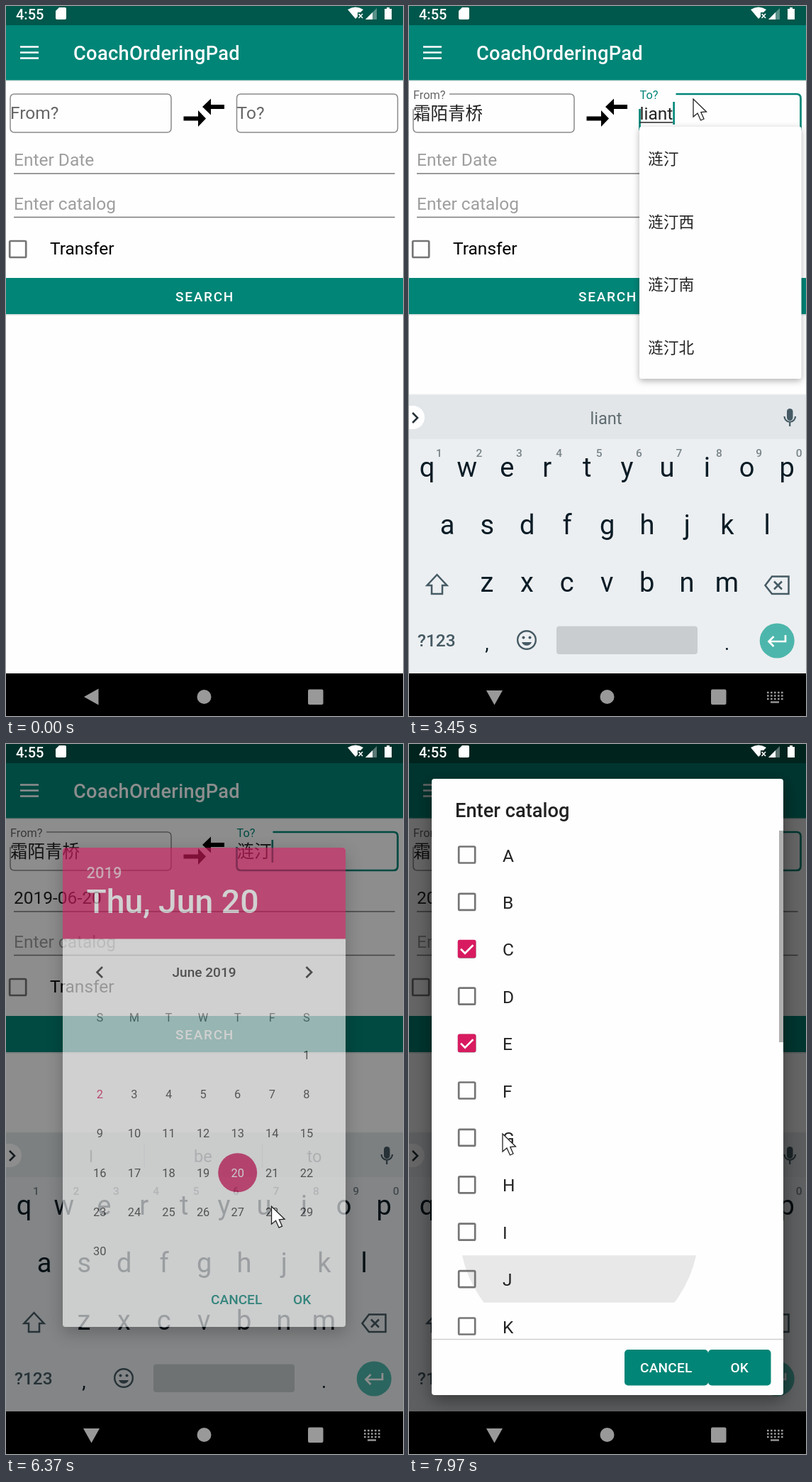
Recreate the animation shown at these times as an HTML page. Size 560 by 1000 pixels, loop 7990 ms.

```html
<!DOCTYPE html>
<html lang="en">
<head>
<meta charset="utf-8">
<title>Ticket search</title>
<style>
html, body { margin: 0; width: 100%; height: 100%; overflow: hidden; background: #fefefe; }
svg { display: block; width: 100vw; height: 100vh; }
text { font-family: Roboto, "Noto Sans CJK SC", "Noto Sans CJK", sans-serif; white-space: pre; }
.popup { filter: drop-shadow(0 3px 5px rgba(0,0,0,.3)); }
.dialog { filter: drop-shadow(0 8px 12px rgba(0,0,0,.4)); }
</style>
</head>
<body>
<script>
const LOOP = 7990, TEAL = '#008577', PINK = '#d81b60', INK = '#222', GREY = '#757575';
const NS = 'http://www.w3.org/2000/svg';

function el(tag, attrs, parent) {
  const node = document.createElementNS(NS, tag);
  set(node, attrs);
  parent.appendChild(node);
  return node;
}
function set(node, attrs) {
  for (const k in attrs) node.setAttribute(k, attrs[k]);
}
const group = (parent, attrs = {}) => el('g', attrs, parent);
const rect = (p, x, y, width, height, fill, rx = 0) => el('rect', { x, y, width, height, fill, rx }, p);
const circle = (p, cx, cy, r, fill) => el('circle', { cx, cy, r, fill }, p);
const shape = (p, d, fill) => el('path', { d, fill }, p);
const line = (p, d, stroke, width = 2.5) =>
  el('path', { d, fill: 'none', stroke, 'stroke-width': width }, p);
function text(p, x, y, str, size, fill, weight = 400, anchor = 'start', spacing = 0) {
  const node = el('text', { x, y, fill, 'font-size': size, 'font-weight': weight,
    'text-anchor': anchor, 'letter-spacing': spacing }, p);
  node.textContent = str;
  return node;
}
const show = (node, on) => node.setAttribute('display', on ? 'inline' : 'none');
const fade = (node, a) => { show(node, a > 0); node.setAttribute('opacity', a); };
const say = (node, str) => { if (node.textContent !== str) node.textContent = str; };
const ramp = (t, a, b) => Math.max(0, Math.min(1, (t - a) / (b - a)));
const mix = (a, b, k) => a + (b - a) * k;
const easeOut = k => 1 - (1 - k) ** 3;
const inside = (t, a, b) => t >= a && t < b;

const svg = el('svg', { viewBox: '0 0 560 1000', preserveAspectRatio: 'none' }, document.body);
const defs = el('defs', {}, svg);
const clip = (id, x, y, w, h) => rect(el('clipPath', { id }, defs), x, y, w, h, '#000');

// ---- page
rect(svg, 0, 0, 560, 1000, '#fefefe');
rect(svg, 0, 104, 560, 2, '#e3e7e6');
rect(svg, 0, 27, 560, 77.5, TEAL);
rect(svg, 0, 0, 560, 27, '#00574b');
line(svg, 'M20 57.5H46M20 65.5H46M20 73.5H46', '#fff', 2.7);
text(svg, 95, 76, 'CoachOrderingPad', 27.25, '#fff', 500, 'start', .3);

function makeField(x, label) {
  const g = group(svg), r = x + 227;
  const frame = line(g, '', GREY);
  const value = text(g, x, 160, '', 24.5, INK);
  const under = line(g, '', INK, 1.4);
  const caret = rect(g, 0, 135, 2.6, 32, TEAL);
  const name = text(g, 0, 0, label, 24.5, '#666');
  const closed = `M${x + 6} 124H${r - 6}q6 0 6 6V172q0 6 -6 6H${x + 6}q-6 0 -6 -6V130q0 -6 6 -6z`;
  const notched = `M${x + 51} 124H${r - 6}q6 0 6 6V172q0 6 -6 6H${x + 6}q-6 0 -6 -6V145`;
  return (up, focus, str, composing, blinkOn) => {
    set(frame, { d: up > .3 ? notched : closed, stroke: focus ? TEAL : '#8a8a8a',
      'stroke-width': focus ? 2.7 : 1.5 });
    set(name, { fill: focus ? TEAL : '#666',
      transform: `translate(${x} ${mix(159, 131, up)}) scale(${mix(1, .667, up)})` });
    say(value, str);
    const w = str ? value.getComputedTextLength() : 0;
    under.setAttribute('d', composing && w ? `M${x} 164H${x + w}` : '');
    caret.setAttribute('x', x + w);
    show(caret, focus && blinkOn);
  };
}
const fromField = makeField(6, 'From?');
const toField = makeField(325.5, 'To?');

shape(svg, 'M277 142L289 130.500V139H308V145H289V153.500ZM282 158.500L271 147V155.500H250.500V161.500H271V170Z', '#000');
const date = text(svg, 11, 224.5, '', 24.5, '#9e9e9e');
line(svg, 'M11 236H548.500M11 297.500H548.500', '#7a7a7a', 1.4);
text(svg, 11, 287, 'Enter catalog', 24.5, '#9e9e9e');
const box = (p, x, y) =>
  el('rect', { x, y, width: 23, height: 23, rx: 1.5, fill: 'none', stroke: GREY, 'stroke-width': 2.7 }, p);
box(svg, 5.2, 331);
text(svg, 62, 350, 'Transfer', 24.5, '#000');
rect(svg, 0, 434, 560, 2, '#e3e7e6');
rect(svg, 0, 383, 560, 51, TEAL);
text(svg, 239, 416, 'SEARCH', 19.07, '#fff', 500, 'start', 1.7);

// ---- suggestion lists
function makeList(x, bottom, items) {
  const g = group(svg, { class: 'popup' });
  rect(g, x, 170, 228.5, bottom - 170, '#fefefe', 3);
  items.forEach((s, i) => text(g, x + 12, 223 + i * 88.6, s, 21.7, INK));
  return g;
}
const fromList = makeList(5.5, 552, ['霜陌南', '霜陌', '霜陌青桥', '霜陌西']);
rect(fromList, 228, 170, 6, 324.5, '#b3b3b3');
const toList = makeList(325, 525, ['涟汀', '涟汀西', '涟汀南', '涟汀北']);

// ---- keyboard
const keys = group(svg), KEY = '#0a1c26', ICON = '#455a64';
rect(keys, 0, 546.5, 560, 2, '#eceeef');
rect(keys, 0, 548, 560, 392, '#eceff1');
rect(keys, 0, 548, 560, 62, '#e2e6e9');
shape(keys, 'M0 563H5.500a16.500 16.500 0 0 1 0 33H0z', '#fff');
line(keys, 'M5 573L12 580L5 587', '#263238', 2.6);
const dividers = line(keys, 'M195 563V597M361.500 563V597', '#c3c8cb', 1.4);
const hints = [120, 278, 435].map(x => text(keys, x, 589, '', 23.6, '#5f6b71', 400, 'middle'));
rect(keys, 533, 567, 8.5, 17, ICON, 4.2);
line(keys, 'M529.500 578a7.700 7.700 0 0 0 15.500 0M537.200 586V592', ICON, 2.2);
[['qwertyuiop', 25.5, 663], ['asdfghjkl', 54, 744], ['zxcvbnm', 110, 825]].forEach(([row, x, y]) =>
  [...row].forEach((c, i) => text(keys, x + i * 56.4, y, c, 38, KEY, 400, 'middle')));
[...'1234567890'].forEach((c, i) => text(keys, 42.5 + i * 56.4, 635, c, 15.5, '#78848a', 500, 'middle'));
line(keys, 'M39.500 801L53.500 816H47V828H32V816H25.500Z', ICON);
line(keys, 'M512 803.500H535.500V828H512L502.500 816ZM515 810.500L526 821.500M526 810.500L515 821.500', ICON);
text(keys, 12, 902, '?123', 24.5, ICON, 500);
text(keys, 110, 907, ',', 27, KEY, 400, 'middle');
text(keys, 448.5, 907, '.', 27, KEY, 400, 'middle');
el('circle', { cx: 166, cy: 893, r: 12.8, fill: 'none', stroke: ICON, 'stroke-width': 2.4 }, keys);
circle(keys, 161.5, 889.5, 2, ICON);
circle(keys, 170.5, 889.5, 2, ICON);
shape(keys, 'M159 896H173a7.500 7.500 0 0 1 -14 0z', ICON);
rect(keys, 208, 873.5, 199, 39.5, '#c9cdd0', 4);
circle(keys, 519.2, 894, 24.5, '#4db6ac');
line(keys, 'M531 886V895H508M514.500 888L507.500 895L514.500 902', '#fff', 2.7);

const dim = rect(svg, 0, 0, 560, 940, '#000');

// ---- status icons
text(svg, 14, 18.5, '4:55', 20, '#fff', 500);
shape(svg, 'M75 2H83q2 0 2 2V17q0 2 -2 2H72q-2 0 -2 -2V7z', '#fff');
shape(svg, 'M482 5Q493 -2 504 5L500 9H496V15L493 18Z', '#fff');
line(svg, 'M497.500 11L503 17M503 11L497.500 17', '#fff', 1.6);
shape(svg, 'M507 19H523V3Z', 'rgba(255,255,255,.35)');
shape(svg, 'M507 19H517V9Z', '#fff');
shape(svg, 'M534 4H537V2H541V4H544V19H534Z', '#fff');

// ---- date dialog
const cal = group(svg, { class: 'dialog' });
rect(cal, 80, 146, 399, 675, '#fefefe', 4);
shape(cal, 'M80 274.500V150q0 -4 4 -4H475q4 0 4 4V274.500z', PINK);
text(cal, 113.5, 189, '2019', 22, 'rgba(255,255,255,.7)', 500);
const heading = text(cal, 113.5, 238, '', 46.4, '#fff', 500);
text(cal, 279.5, 328, 'June 2019', 19.07, '#2a2a2a', 500, 'middle');
line(cal, 'M136 314L128.500 321.500L136 329M423.500 314L431 321.500L423.500 329', INK, 2.7);
const colX = i => 132.3 + i * 48.6;
[...'SMTWTFS'].forEach((c, i) => text(cal, colX(i), 391, c, 16.4, GREY, 400, 'middle'));
const disc = circle(cal, 0, 0, 27.5, PINK);
const days = [];
for (let n = 1; n <= 30; n++)
  days[n] = text(cal, colX((n + 5) % 7), 443.5 + Math.floor((n + 5) / 7) * 55.35, n, 16.4, '#333', 400, 'middle');
const okRipple = rect(cal, 374, 758, 88, 48, 'rgba(0,133,119,.15)', 4);
text(cal, 289, 789, 'CANCEL', 19.07, TEAL, 500);
text(cal, 405, 789, 'OK', 19.07, TEAL, 500);

function drawCalendar(t) {
  const day = t < 4900 ? 2 : t < 5650 ? 13 : 20;
  say(heading, (day === 2 ? 'Sun' : 'Thu') + ', Jun ' + day);
  set(disc, { cx: colX((day + 5) % 7), cy: 437.7 + Math.floor((day + 5) / 7) * 55.35 });
  [2, 13, 20].forEach(n => days[n].setAttribute('fill', n === day ? '#fff' : n === 2 ? PINK : '#333'));
  fade(okRipple, inside(t, 6060, 6300) ? ramp(t, 6060, 6120) : 0);
}

// ---- catalog dialog
const cat = group(svg, { class: 'dialog' }), ROW = 66.4;
rect(cat, 32, 49, 496, 868, '#fefefe', 4);
text(cat, 65, 103, 'Enter catalog', 27.25, INK, 500);
clip('list', 32, 122, 496, 716);
clip('rowE', 32, 389, 496, ROW);
clip('rowJ', 32, 720.3, 496, ROW);
const list = group(cat, { 'clip-path': 'url(#list)' });
const makeRipple = id => circle(group(list, { 'clip-path': `url(#${id})` }), 0, 0, 0, '#e8e8e8');
const rippleE = makeRipple('rowE'), rippleJ = makeRipple('rowJ');
const ticks = {};
[...'ABCDEFGHIJK'].forEach((c, i) => {
  const y = 156 + i * ROW;
  box(list, 70.2, y - 11.5);
  text(list, 132, y + 9.5, c, 24.5, INK);
  if (c === 'C' || c === 'E') {
    ticks[c] = group(list);
    rect(ticks[c], 68.8, y - 13, 25.5, 25.5, PINK, 2.5);
    line(ticks[c], `M73 ${y}l6 6l11.500 -11.500`, '#fff', 2.7);
  }
});
rect(cat, 522, 122, 6, 298, '#b0b0b0');
line(cat, 'M32 838.500H528', '#cfcfcf', 1.4);
rect(cat, 304, 853, 118, 50.5, TEAL, 5);
rect(cat, 422, 853, 88.5, 50.5, TEAL, 5);
text(cat, 326, 885, 'CANCEL', 19.07, '#fff', 500, 'start', .2);
text(cat, 453.5, 885, 'OK', 19.07, '#fff', 500);

function drawCatalog(t) {
  fade(ticks.C, ramp(t, 7700, 7780));
  fade(ticks.E, ramp(t, 7850, 7900));
  set(rippleE, { cx: 180, cy: 422, r: mix(20, 360, ramp(t, 7830, 7900)) });
  fade(rippleE, t < 7830 ? 0 : 1 - ramp(t, 7890, 7960));
  const k = ramp(t, 7915, 7970);
  set(rippleJ, { cx: mix(118, 240, k), cy: mix(767, 684, k), r: mix(20, 169, k) });
  show(rippleJ, k > 0);
}

// ---- navigation bar
rect(svg, 0, 940, 560, 60, '#000');
const back = shape(svg, 'M110 973L130.500 961.500V984.500Z', '#999');
circle(svg, 279.500, 973, 10, '#999');
rect(svg, 426, 962.5, 21.5, 21.5, '#999', 2);
const imeIcon = group(svg);
[967, 971.5, 976].forEach(y =>
  set(line(imeIcon, `M505 ${y}H528`, '#999', 2.6), { 'stroke-dasharray': '2.6 2.400' }));
line(imeIcon, 'M510 980.500H522', '#999', 2.4);

// ---- pointer
const pointer = el('path', { d: 'M0 0V25L6 20L10.500 30L15 28L10.800 18.600L18.500 18Z',
  fill: '#fff', stroke: '#222', 'stroke-width': 1.3 }, svg);
const PATH = [
  [80, 520, 440], [320, 110, 146], [1690, 110, 146], [1920, 95, 365], [2050, 88, 392], [2130, 88, 392],
  [2430, 395, 92], [2540, 398, 126], [2700, 401, 131], [3730, 401, 131], [3920, 372, 208], [4060, 372, 208],
  [4440, 150, 212], [4560, 150, 212], [4770, 325, 541], [5350, 325, 541], [5600, 322, 600], [5720, 322, 600],
  [6010, 418, 768], [6180, 418, 768], [6370, 376, 653], [6570, 84, 290], [7050, 84, 290], [7500, 110, 285],
  [7740, 110, 285], [7820, 112, 415], [7860, 112, 415], [7915, 118, 767], [7970, 132, 549]
];
function drawPointer(t) {
  let i = PATH.findIndex(p => p[0] > t);
  if (i < 0) i = PATH.length - 1;
  i = Math.max(1, i);
  const [t0, x0, y0] = PATH[i - 1], [t1, x1, y1] = PATH[i], k = ramp(t, t0, t1);
  pointer.setAttribute('transform', `translate(${mix(x0, x1, k)} ${mix(y0, y1, k)})`);
  show(pointer, t >= 80);
}

// ---- timeline
const FROM = 'shuangmo', TO = 'liant';
const FROM_KEYS = [840, 900, 960, 1020, 1090, 1150], TO_KEYS = [3100, 3130, 3165, 3200, 3360];

function draw(t) {
  const n = FROM_KEYS.filter(k => k <= t).length, m = TO_KEYS.filter(k => k <= t).length;
  const picked = t >= 2130, chosen = t >= 4060, onTo = t >= 2550;
  const blink = !inside(t, 1560, 1700);
  fromField(ramp(t, 330, 430), t >= 330 && !onTo, picked ? '霜陌青桥' : FROM.slice(0, n), !picked, blink);
  toField(ramp(t, 2550, 2650), onTo, chosen ? '涟汀' : TO.slice(0, m), !chosen, true);
  fade(fromList, ramp(t, 1150, 1215) * (1 - ramp(t, 2130, 2210)));
  fade(toList, ramp(t, 3370, 3440) * (1 - ramp(t, 4060, 4140)));

  const typingFrom = n && !picked, typingTo = m && !chosen;
  const words = typingFrom ? [FROM.slice(0, n), FROM.slice(0, n + 2), FROM.slice(0, n + 1)]
    : typingTo ? ['', TO.slice(0, m), ''] : ['I', 'be', 'to'];
  words.forEach((w, i) => say(hints[i], w));
  show(dividers, !typingTo);

  const up = easeOut(ramp(t, 540, 840));
  keys.setAttribute('transform', `translate(0 ${392 * (1 - up)})`);
  show(keys, up > 0);
  back.setAttribute('transform', `rotate(${-90 * up} 121 973.500)`);
  fade(imeIcon, up);

  const dated = t >= 6190;
  say(date, dated ? '2019-06-20' : 'Enter Date');
  date.setAttribute('fill', dated ? INK : '#9e9e9e');

  fade(dim, .6 * (ramp(t, 4620, 4834) - ramp(t, 6306, 6560) + ramp(t, 6990, 7200)));
  fade(cal, ramp(t, 4620, 4740) - ramp(t, 6300, 6475));
  fade(cat, ramp(t, 6990, 7110));
  drawCalendar(t);
  drawCatalog(t);
  drawPointer(t);
}

const start = performance.now();
function tick() {
  draw((performance.now() - start) % LOOP);
  requestAnimationFrame(tick);
}
tick();
</script>
</body>
</html>
```
